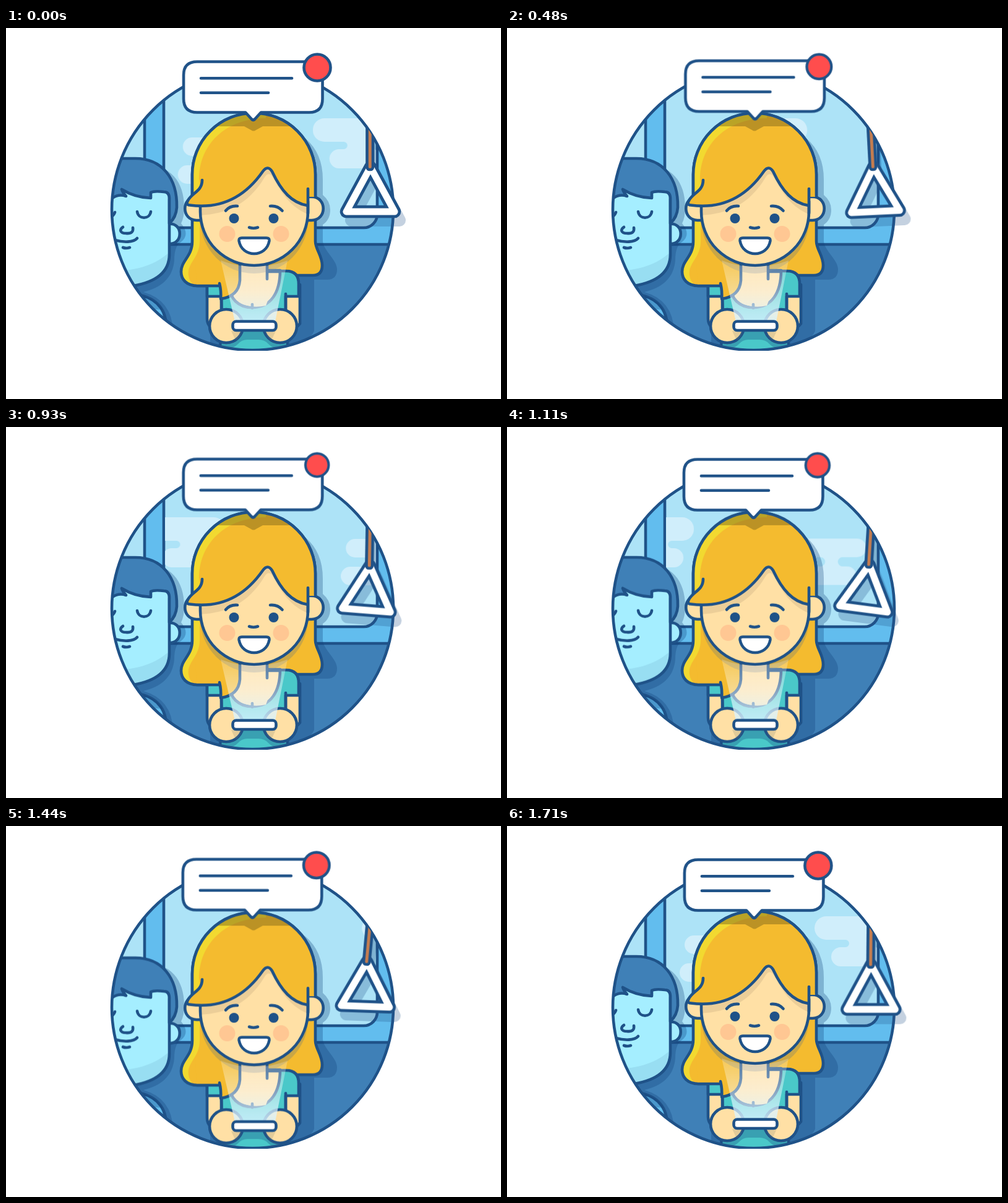
Animation of 800x600 px, one loop 1740 ms. Source, as an HTML page:

```html
<!DOCTYPE html>
<html lang="en">
<head>
<meta charset="utf-8">
<title>Message on the train</title>
<style>
html, body { margin: 0; width: 100%; height: 100%; overflow: hidden; background: #fff; }
svg { display: block; width: 800px; height: 600px; }
.line { fill: none; }
.ink { stroke: #1f5288; stroke-width: 4.6; stroke-linecap: round; stroke-linejoin: round; }
.shade { fill: #0f3f78; fill-opacity: .29; }
.hair { fill: #f4bb2f; }
.glow { fill: #f2d930; }
.skin { fill: #ffe0a5; }
.shirt { fill: #4ac8c9; }
.steel { fill: #3f80b7; }
.band { fill: #62bdee; }
.sky { fill: #ade3f7; }
.ice { fill: #a5eeff; }
.white { fill: #fff; }
.dark { fill: #1f5288; }
.cheek { fill: #ffc793; }
.cloud { fill: #d0eefb; }

.bob, .blink, .sway, .rise, .pulse, .swing, .dangle, .drift, .pass {
  animation-duration: 1740ms;
  animation-iteration-count: infinite;
  animation-timing-function: linear;
}
.bob { animation-name: bob; animation-timing-function: ease-in-out; }
.girl { --up: -2.7px; --down: 2.2px; }
.hands { --up: -1.3px; --down: 1.4px; }
.rider { --up: -3.8px; --down: 2.3px; }
@keyframes bob {
  0%, 62.07%, 93.1%, 100% { transform: translateY(0); }
  72.41% { transform: translateY(var(--up)); }
  82.76% { transform: translateY(var(--down)); }
}
.blink { animation-name: blink; transform-origin: 400px 308px; }
@keyframes blink {
  0%, 12.1%, 23.6%, 100% { transform: scaleY(1); }
  17.8% { transform: scaleY(.1); }
}
.sway, .rise, .pulse { animation-timing-function: cubic-bezier(.37, 0, .63, 1); }
.sway { animation-name: sway; animation-delay: -435ms; }
@keyframes sway {
  0%, 100% { transform: translateX(-1.4px); }
  50% { transform: translateX(1.4px); }
}
.rise { animation-name: rise; }
@keyframes rise { 50% { transform: translateY(-2.6px); } }
.pulse { animation-name: pulse; transform-origin: 503px 64px; }
@keyframes pulse { 50% { transform: scale(.87); } }

.swing { animation-name: swing; transform-origin: 588px 165px; }
@keyframes swing {
  0%, 100% { transform: translateY(0) rotate(0); }
  15.5% { transform: translateY(0) rotate(-2.7deg); }
  24.1% { transform: translateY(0) rotate(-3.4deg); }
  39.7% { transform: translateY(0) rotate(-1.8deg); }
  53.4% { transform: translateY(-.5px) rotate(1deg); }
  63.2% { transform: translateY(-2px) rotate(3.4deg); }
  72.4% { transform: translateY(-4px) rotate(5deg); }
  78.2% { transform: translateY(-5px) rotate(5.6deg); }
  82.8% { transform: translateY(-5px) rotate(5.3deg); }
  92% { transform: translateY(-2px) rotate(2.6deg); }
}
.dangle { animation-name: dangle; transform-origin: 588px 228px; }
@keyframes dangle {
  0%, 100% { transform: rotate(0); }
  39.7% { transform: rotate(.5deg); }
  53.4% { transform: rotate(3.5deg); }
  63.2% { transform: rotate(4.1deg); }
  72.4% { transform: rotate(2.6deg); }
  78.2% { transform: rotate(0); }
  82.8% { transform: rotate(-3.3deg); }
  92% { transform: rotate(-2.6deg); }
}
.drift { animation-name: drift; }
@keyframes drift { 98.3%, 100% { transform: translateX(-497px); } }
.pass { animation-name: pass; }
@keyframes pass {
  0% { transform: translate(278px, 177px); }
  27% { transform: translate(141px, 177px); }
  27.01%, 44% { transform: translate(632px, 181px); }
  53.4% { transform: translate(542px, 181px); }
  72.4% { transform: translate(405px, 180px); }
  98.3% { transform: translate(279px, 177px); }
  100% { transform: translate(278px, 177px); }
}
</style>
</head>
<body>
<svg viewBox="0 0 800 600">
  <defs>
    <clipPath id="stage"><rect width="800" height="522"/></clipPath>
    <clipPath id="disc"><circle cx="398.500" cy="293.500" r="227.500"/></clipPath>
    <clipPath id="pane"><path d="M257 60H598V302Q598 321 579 321H257Z"/></clipPath>
    <clipPath id="faceClip"><circle cx="401" cy="297" r="87"/></clipPath>
    <clipPath id="capClip"><use href="#cap"/></clipPath>
    <clipPath id="maneClip"><use href="#mane"/></clipPath>
    <clipPath id="shirtClip"><use href="#shirt"/></clipPath>
    <clipPath id="riderClip"><use href="#riderFace"/></clipPath>
    <linearGradient id="beam" x1="0" y1="375" x2="0" y2="475" gradientUnits="userSpaceOnUse">
      <stop offset="0" stop-color="#fff" stop-opacity=".2"/>
      <stop offset=".5" stop-color="#f8fcff" stop-opacity=".46"/>
      <stop offset="1" stop-color="#d4f2ff" stop-opacity=".85"/>
    </linearGradient>
    <path id="bigCloud" d="M19 0H110a19 19 0 0 1 0 38H93a6 6 0 0 0 0 12H96.500a15.500 15.500 0 0 1 0 31H42.500a15.500 15.500 0 0 1 0-31H50a6 6 0 0 0 0-12H19a19 19 0 0 1 0-38Z"/>
    <path id="smallCloud" d="M23 0H99a15 15 0 0 1 0 30H75.500a7.500 7.500 0 0 0 0 15H83a15 15 0 0 1 0 30H15a15 15 0 0 1 0-30H40a7.500 7.500 0 0 0 0-15H23a15 15 0 0 1 0-30Z"/>
    <path id="riderFace" d="M150 250H250Q264 250 264 275V366C264 395 242 411 207 417L150 417Z"/>
    <path id="riderHair" d="M150 211H209C252 211 277 243 276 290Q275 306 264 316V276Q264 265 255 265Q240 263 234 266V275Q208 274 187 261Q189 267 194 272Q182 268 172 275H150Z"/>
    <path id="mane" d="M301 237A99.500 99.500 0 0 1 500 237V345C500 358 511 368 511 384Q511 400 496 400H440V417H310C291 417 283 406 283 394C283 376 301 370 301 345Z"/>
    <path id="shirt" d="M325 434V415Q330 393 350 393H453Q473 393 473 414V434H452V455Q452 495 458 530H344Q350 490 348 434Z"/>
    <path id="cap" d="M301 270V237A99.500 99.500 0 0 1 500 237V273H488V287C462 283 445 264 430 232Q423 221 415 232C385 275 345 293 297 286.500Q290 286 294 279Q297 274 301 270Z"/>
    <path id="ring" d="M589 225L550 297H628Z"/>
  </defs>

  <g clip-path="url(#stage)">
    <g clip-path="url(#disc)">
      <rect class="band" x="160" y="50" width="480" height="300"/>
      <rect class="sky ink" x="120" y="30" width="104" height="293"/>
      <rect class="sky ink" x="255" y="20" width="345" height="303" rx="22"/>
      <g clip-path="url(#pane)">
        <g class="cloud drift">
          <use href="#bigCloud" x="496" y="146"/>
          <use href="#bigCloud" x="994" y="146"/>
        </g>
        <g class="cloud pass"><use href="#smallCloud"/></g>
      </g>
      <rect class="steel ink" x="100" y="350" width="600" height="200"/>

      <!-- wall shadows -->
      <path class="shade" d="M215 222C262 218 288 245 288 290Q288 306 283 316Q298 334 283 346Q272 352 272 375C270 405 250 420 222 427Q268 440 270 490H200L160 417V222Z"/>
      <path class="shade" d="M400 150Q512 160 512 245V270Q524 280 524 294Q524 310 512 318V345C513 360 535 375 535 390Q535 407 519 407H498V490Q490 510 440 520H330V430H400Z"/>

      <!-- neighbour -->
      <path class="band ink" d="M206 430C238 434 257 450 259 480L180 500Z"/>
      <path class="shade" d="M206 430C230 433 246 442 253 456Q232 455 212 446Z"/>
      <g class="bob rider">
        <path class="ice ink" d="M262 317C287 313 287 352 262 349Z"/>
        <use href="#riderFace" class="ice"/>
        <path d="M150 392C205 397 246 384 270 356V425H150Z" fill="#98def2" clip-path="url(#riderClip)"/>
        <path class="line ink" d="M264 276V366C264 395 242 411 205 417"/>
        <use href="#riderHair" class="steel ink"/>
        <g class="line ink">
          <path d="M212 297C214 310 232 310 234 297M176 298Q174 304 168 306"/>
          <path d="M189 322C183 326 184 332 194 332C203 333 206 329 205 323"/>
          <path d="M176 343C190 347 206 347 212 340M189 355Q194 357 200 355"/>
        </g>
      </g>

      <!-- girl -->
      <g class="bob girl">
        <use href="#mane" class="hair"/>
        <path class="glow" clip-path="url(#maneClip)" d="M296 230H313V345C313 372 292 380 295 400Q296 412 308 418H280V370Z"/>
        <use href="#mane" class="line ink"/>

        <path class="skin ink" d="M325 415H475V478Q466 490 440 490H350Q325 488 325 470Z"/>
        <use href="#shirt" class="shirt ink"/>
        <path class="skin ink" d="M362 392H443C443 428 428 452 398 452C374 452 362 436 362 420Z"/>
        <path class="skin" d="M379 380H422V393H441L420 449Q398 454 379 445Z"/>
        <path class="line ink" d="M443 394H424M422 380V406M398 447V453M452 430V460M348 434V460"/>
        <g class="shade" clip-path="url(#shirtClip)">
          <path d="M329 482H470V492A27 27 0 0 1 424 511Q418 504 408 504H390Q381 504 375 511A27 27 0 0 1 329 492Z"/>
        </g>
        <path class="hair" d="M306 375H378V408Q376 434 347 438L345 417H308Z"/>
        <path class="line ink" d="M378 382V408Q376 434 347 438Q348 425 345 413M308 417H345"/>
        <circle cx="401" cy="310" r="87" fill="#48698a" fill-opacity=".25"/>

        <path class="skin ink" d="M318 273H308C283 273 283 311 308 311H320Z"/>
        <path class="skin ink" d="M484 273H494C519 273 519 311 494 311H484Z"/>
        <circle class="skin" cx="401" cy="297" r="87"/>
        <g clip-path="url(#faceClip)">
          <path fill="#b79a72" fill-opacity=".27" d="M301 200H500V305C466 296 450 275 434 246Q425 228 417 243C390 288 350 304 301 303Z"/>
        </g>
        <path class="line ink" d="M314 287V297A87 87 0 0 0 488 297V280"/>
        <circle class="cheek" cx="357.500" cy="333" r="13"/>
        <circle class="cheek" cx="444.500" cy="333" r="13"/>
        <g class="dark blink">
          <circle cx="368.500" cy="308" r="8"/>
          <circle cx="432.500" cy="308" r="8"/>
        </g>
        <path class="line ink" d="M355 295.500Q362 287 374 288M427 288Q439 287 446.500 295.500M393 322.500Q400 325 407 322.500"/>
        <path class="white ink" d="M376.500 344Q376 339.500 381 339.500H421Q426 339.500 425.500 344C421 372 381 372 376.500 344Z"/>

        <use href="#cap" class="hair"/>
        <g clip-path="url(#capClip)">
          <path class="glow" d="M290 268V130H420V146C355 146 312 188 312 245L314 258L303 269Z"/>
          <path d="M290 120H510V159H415L404 165Q400 168 396 165L385 159H290Z" fill="#6b5a1a" fill-opacity=".42"/>
        </g>
        <path class="line ink" d="M301 270V237A99.500 99.500 0 0 1 500 237V272M488 260V300"/>
        <path class="line ink" d="M317 246C317 264 301 266 294 279Q290 286 297 286.500C345 293 385 275 415 232Q423 221 430 232C445 264 462 283 487 287"/>

        <g class="bob hands">
          <circle class="skin ink" cx="356" cy="482" r="27"/>
          <circle class="skin ink" cx="443" cy="482" r="27"/>
          <path d="M364 490H381Q379 501 371 505ZM436 490H419Q421 501 429 505Z" fill="#7a7f70" fill-opacity=".22"/>
          <path d="M347 376Q401 396 455 376L435 475H370Z" fill="url(#beam)"/>
          <rect class="white ink" x="366.500" y="474.500" width="70" height="14.500" rx="5.500"/>
        </g>
      </g>
    </g>
    <circle class="line ink" cx="398.500" cy="293.500" r="227.500"/>
  </g>

  <!-- hand strap -->
  <g clip-path="url(#disc)"><g class="swing">
    <rect class="shade" x="592" y="120" width="10" height="112" rx="4"/>
  </g></g>
  <g transform="translate(8 14)" opacity=".27"><g class="swing"><g class="dangle">
    <use href="#ring" class="line ink" style="stroke-width:20"/>
  </g></g></g>
  <g class="swing"><g class="dangle">
    <use href="#ring" class="line ink" style="stroke-width:20.500"/>
    <use href="#ring" class="line" stroke="#fff" stroke-width="11" stroke-linejoin="round"/>
  </g></g>
  <g clip-path="url(#disc)"><g class="swing">
    <rect class="ink" x="583.500" y="120" width="9.500" height="109" rx="4" fill="#c47d50"/>
  </g></g>

  <!-- message -->
  <g class="sway"><g class="rise">
    <path class="white ink" d="M309 54.500H490Q511.500 54.500 511.500 76V114.500Q511.500 136.500 490 136.500H412L402 147.500Q399.500 150 397 147.500L387 136.500H309Q287 136.500 287 114.500V76Q287 54.500 309 54.500Z"/>
    <path class="line ink" d="M315 81.300H462M315 104.700H424"/>
    <circle class="ink pulse" cx="503" cy="64" r="21.500" fill="#ff4d4d"/>
  </g></g>
</svg>
</body>
</html>
```
